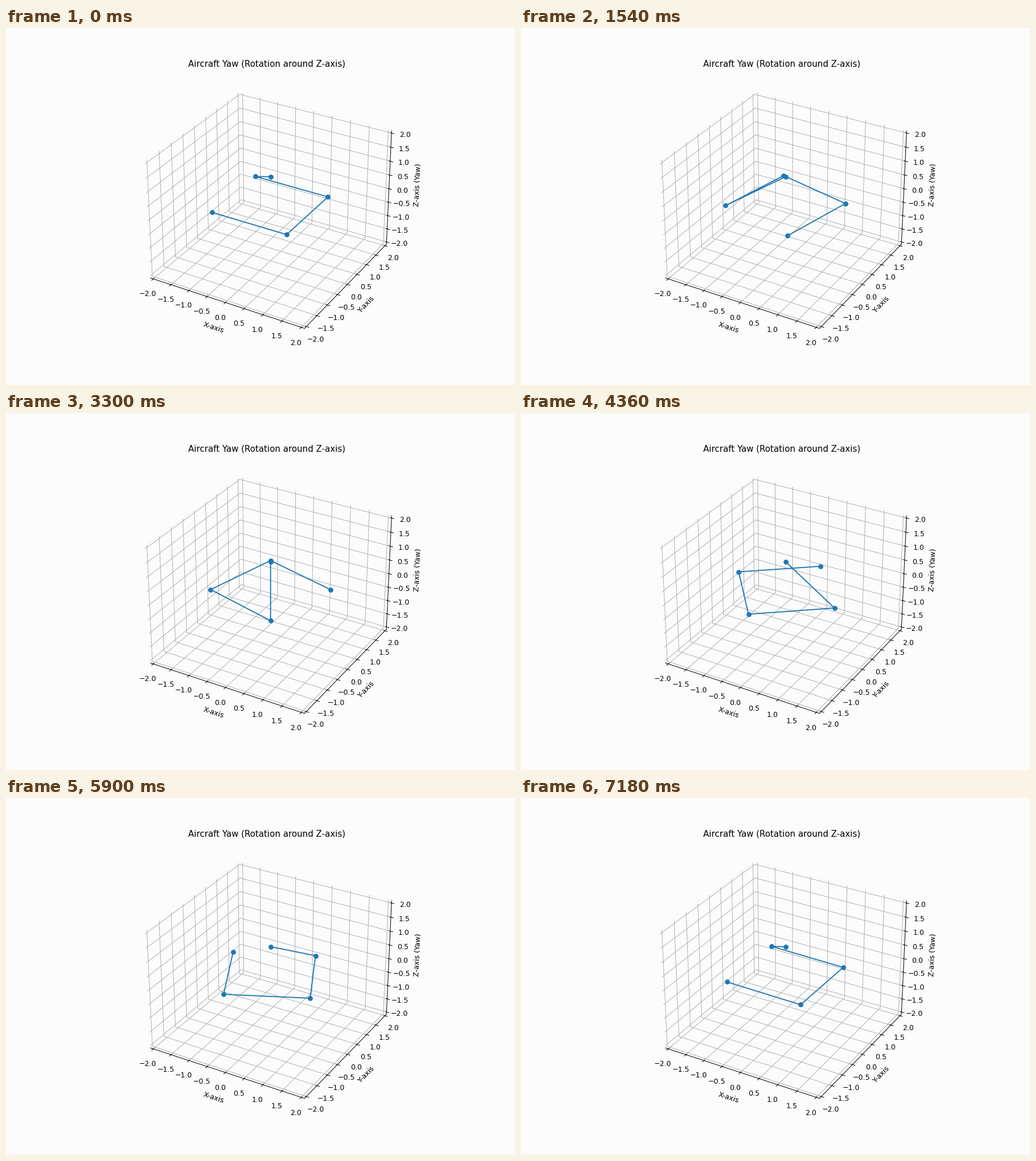
Recreate the animation shown at these times as a matplotlib script. Size 894 px wide and 626 px high, loop 7.2 s.

```python
import matplotlib.pyplot as plt
import numpy as np
from matplotlib.animation import FuncAnimation
from matplotlib.lines import Line2D
from matplotlib.transforms import IdentityTransform
from mpl_toolkits.mplot3d import proj3d

FRAMES = 360
BG = "#fcfcfc"
CRAFT = np.array([[-1, -1, 0], [1, -1, 0], [1, 1, 0], [-1, 1, 0], [0, 0, 1]], float)

plt.rcParams["axes3d.automargin"] = True
fig = plt.figure(figsize=(9.9334, 6.9556), dpi=90, facecolor=BG)  # 894 x 626 px
ax = fig.add_subplot(projection="3d", facecolor=BG)
ax.set(xlim=(-2, 2), ylim=(-2, 2), zlim=(-2, 2),
       xlabel="X-axis", ylabel="Y-axis", zlabel="Z-axis (Yaw)",
       title="Aircraft Yaw (Rotation around Z-axis)")
for axis in (ax.xaxis, ax.yaxis, ax.zaxis):
    axis.pane.set_facecolor(BG)
    axis.pane.set_edgecolor("#f5f5f5")

# The scene never changes, so render it once and reuse it as a backdrop.
fig.canvas.draw()
backdrop = np.array(fig.canvas.buffer_rgba())
proj, to_pixels = ax.get_proj(), ax.transData.frozen()
ax.remove()
fig.figimage(backdrop)

line = Line2D([], [], marker="o", color="C0", transform=IdentityTransform())
fig.add_artist(line)


def yaw(points, angle):
    c, s = np.cos(angle), np.sin(angle)
    return points @ np.array([[c, s, 0], [-s, c, 0], [0, 0, 1]])


def project(points):
    x, y, _ = proj3d.proj_transform(*points.T, proj)
    return to_pixels.transform(np.column_stack([x, y]))


def update(frame):
    line.set_data(*project(yaw(CRAFT, np.radians(frame))).T)
    return (line,)


anim = FuncAnimation(fig, update, frames=FRAMES, interval=20, repeat=True)
plt.show()
```
